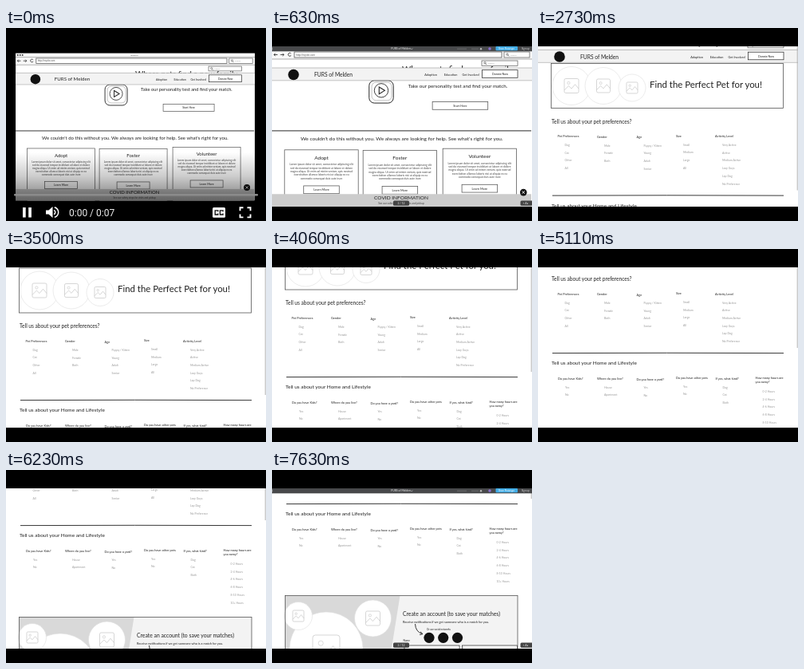
An HTML page for the animation above (7.7 s loop, 326 by 242 pixels).

```html
<!DOCTYPE html>
<html lang="en">
<head>
<meta charset="utf-8">
<title>Pet adoption prototype</title>
<style>
html, body { margin: 0; width: 100%; height: 100%; overflow: hidden; background: #000; }
svg { display: block; width: 326px; height: 242px; font-family: Lato, "Open Sans", sans-serif; }
</style>
</head>
<body>
<svg id="stage" viewBox="0 0 326 242" xmlns="http://www.w3.org/2000/svg"></svg>
<script>
const LOOP = 7700, STEP = 70;
const INK = '#222', LINE = '#555', PALE = '#999';

const text = (x, y, size, str, fill = INK, extra = '') =>
  `<text x="${x}" y="${y}" font-size="${size}" fill="${fill}" ${extra}>${str}</text>`;
const mid = (x, y, size, str, fill = INK) => text(x, y, size, str, fill, 'text-anchor="middle"');
const rect = (x, y, w, h, fill = '#fff', stroke = 'none', sw = .7, r = 0) =>
  `<rect x="${x}" y="${y}" width="${w}" height="${h}" rx="${r}" fill="${fill}" stroke="${stroke}" stroke-width="${sw}"/>`;
const circle = (x, y, r, fill = '#fff', stroke = 'none', sw = .6) =>
  `<circle cx="${x}" cy="${y}" r="${r}" fill="${fill}" stroke="${stroke}" stroke-width="${sw}"/>`;
const path = (d, stroke = LINE, sw = .7, fill = 'none') =>
  `<path d="${d}" stroke="${stroke}" stroke-width="${sw}" fill="${fill}"/>`;

// Image placeholder: framed hills and a sun, centred on x, y.
const picture = (x, y, s, c = '#bbb') => {
  const h = s / 2;
  return rect(x - h, y - h, s, s, 'none', c, .7, s * .1) + circle(x - h * .4, y - h * .4, s * .09, 'none', c) +
    path(`M${x - h} ${y + h * .6}l${h * .6} ${-h * .6} ${h * .4} ${h * .4} ${h * .5} ${-h * .6} ${h * .5} ${h * .6}`, c);
};

const searchBox = (x, y, w, h) =>
  rect(x, y, w, h, '#fff', LINE) + circle(x + 4, y + h / 2 - .4, 1.2, 'none', INK, .5) +
  path(`M${x + 4.8} ${y + h / 2 + .5}l1.4 1.4`, INK, .6) + text(x + 8, y + h / 2 + 1, 2.6, 'Search', '#999');

const browser = () =>
  rect(0, 23, 326, 16, '#f8f8f8') +
  [3, 6.2, 9.4].map(x => circle(x, 25.6, 1, '#222')).join('') +
  mid(162, 26.6, 2.8, 'Browser', '#555') + path('M0 28.5H326M0 39H326', '#777', .6) +
  path('M7 33.5H2.5l1.7-1.7M2.5 33.5l1.7 1.7M10.5 33.5H15l-1.7-1.7M15 33.5l-1.7 1.7M23.8 32a2 2 0 1 0 .2 2.3', INK, .8) +
  rect(28, 30, 260, 7, '#fff', LINE, .8) + text(30, 34.7, 3.1, 'http://mysite.com', '#555') + searchBox(291, 30, 32, 7);

const siteHeader = links => {
  const top = [['About', 150], ['Calendar', 175], ['Blog', 200], ['Login', 224], ['Contact', 249]];
  const main = [['Adoption', 199], ['Education', 224], ['Get Involved', 249]];
  return (links ? rect(0, 39.4, 326, 11, '#fafafa') + top.map(([s, x]) => mid(x, 45, 3.4, s)).join('') : '') +
    rect(0, 50, 326, 15.5, '#f3f3f3') + path('M0 50H326M0 65.8H326', '#999', .6) + searchBox(263, 41, 45, 6.3) +
    circle(27, 58.5, 6.8, '#111') + text(53, 61, 6.7, 'FURS of Melden') +
    main.map(([s, x]) => mid(x, 60, 3.8, s)).join('') +
    rect(263.5, 52.7, 44.5, 9.6, '#fff', INK) + mid(286, 59, 3.6, 'Donate Now');
};

const card = (x, y, title) => rect(x, y, 85, 70, '#fff', LINE) + mid(x + 42.5, y + 11, 6, title) +
  ['Lorem ipsum dolor sit amet, consectetur adipiscing elit', 'sed do eiusmod tempor incididunt ut labore et dolore',
   'magna aliqua. Ut enim ad minim veniam, quis nostrud', 'exercitation ullamco laboris nisi ut aliquip ex ea',
   'commodo consequat duis aute irure']
    .map((s, i) => mid(x + 42.5, y + 18 + i * 4, 3.1, s, '#444')).join('') +
  rect(x + 22, y + 41.5, 41, 9, '#fff', LINE) + mid(x + 42.5, y + 47.3, 3.6, 'Learn More');

const home = () => rect(0, 23, 326, 201) +
  `<g transform="translate(162 124) scale(1.087) translate(-162 -124.5)">` +
  text(163, 61.5, 10, 'Where pets find a new family') +
  rect(125, 71, 28, 26, '#fff', INK, .9, 6) + rect(128, 73, 23, 21, 'none', '#888', .5, 5) +
  circle(139, 82.5, 8, '#fff', INK, .8) + path('M136.5 78.5v8l6.5-4z', INK, 1) +
  text(170, 79.5, 5.75, 'Take our personality test and find your match.') +
  rect(198, 95.5, 64, 9, '#fff', LINE) + mid(230, 101.5, 3.5, 'Start Here') +
  path('M12 129H312', INK, .9) +
  text(46, 140.5, 6, "We couldn't do this without you. We always are looking for help. See what's right for you.") +
  card(27.5, 151, 'Adopt') + card(118, 151.5, 'Foster') + card(210, 149.5, 'Volunteer') +
  rect(12, 202, 300, 16, '#ccc') + mid(162, 208, 6, 'COVID INFORMATION') +
  mid(162, 214, 3, 'See our safety steps for visits and pickup', '#444') +
  circle(303, 200, 4, '#111') + path('M301.4 198.4l3.2 3.2m0-3.2l-3.2 3.2', '#fff', .8) +
  '</g>' + browser() + siteHeader(false);

const column = (x, y, heading, items, gap = 11) =>
  heading.split('|').map((s, i) => text(x, y + i * 5, 3.9, s)).join('') +
  items.split(',').map((s, i) => text(x + 9, y + gap + i * 9.7, 3.5, s, PALE)).join('');

const bubble = (x, y, r, icon) => circle(x, y, r, '#fff', '#ddd') + picture(x, y, icon, '#c4c4c4');

const quiz = () => rect(0, 23, 326, 460) + browser() + siteHeader(true) +
  path('M325.2 40V226', '#aaa', .9) +
  rect(16.5, 67, 291, 56, '#fff', LINE, .8) +
  bubble(42, 95, 24, 18) + bubble(82, 95, 23, 17) + bubble(118, 97.5, 17, 14) +
  text(140, 97, 11.4, 'Find the Perfect Pet for you!') +
  text(17, 142, 6.6, 'Tell us about your pet preferences?') +
  column(24.5, 159.5, 'Pet Preferences', 'Dog,Cat,Other,All') +
  column(74, 160, 'Gender', 'Male,Female,Both') +
  column(123.5, 160.5, 'Age', 'Puppy / Kitten,Young,Adult,Senior', 10.5) +
  column(173, 159, 'Size', 'Small,Medium,Large,All') +
  column(222, 159.5, 'Activity Level', 'Very Active,Active,Medium Active,Lazy Guys,Lap Dog,No Preference') +
  path('M18 232.6Q160 232 308 232.6', INK, .9) +
  text(17, 247, 6.5, 'Tell us about your Home and Lifestyle') +
  column(25, 265.5, 'Do you have Kids?', 'Yes,No') +
  column(74, 265.5, 'Where do you live?', 'House,Apartment') +
  column(123.5, 266.5, 'Do you have a yard?', 'Yes,No', 10.5) +
  column(173, 265, 'Do you have other pets', 'Yes,No', 10.5) +
  column(222.5, 265.5, 'If yes, what kind?', 'Dog,Cat,Both') +
  column(272.5, 265, 'How many hours are|you away?', '0-2 Hours,2-4 Hours,4-6 Hours,6-8 Hours,8-10 Hours,10+ Hours', 17) +
  account();

const account = () => rect(16.5, 347.5, 291.5, 110, '#f3f3f3') +
  path('M16.5 347.5H160.5L143 457H16.5z', 'none', 0, '#d9d9d9') +
  bubble(68, 414, 46, 34) + bubble(33, 373, 17.5, 14) + bubble(126.5, 376, 23, 18) +
  rect(16.5, 347.5, 291.5, 110, 'none', LINE, .8) +
  text(164, 373, 6.8, 'Create an account (to save your matches)') +
  text(164, 382, 3.9, 'Receive notifications if we get someone who is a match for you.') +
  path('M179.5 383Q180 393 188.5 395.5M186 392.8l3 2.8-3.8 1', INK, .9) +
  text(194, 391, 3, 'Or use social networks') +
  [197, 214.7, 232.5].map(x => circle(x, 400.3, 6.6, '#111')).join('') +
  text(164.5, 405, 3.3, 'Name') + rect(166, 410, 69, 9, '#fff', INK) + rect(238.5, 410, 69, 9, '#fff', INK);

const toolbar = () => rect(0, 23, 326, 6.3, '#48494b') +
  mid(161.5, 27, 3.4, 'FURS of Melden', '#eee') + path('M1 24.8l-1.5 1.3 1.5 1.3M174 25.6l1.2 1.2 1.2-1.2', '#ddd', .6) +
  path('M232 26.2h12M250 26.2h9', '#777', .8) + circle(262, 26.2, 1.2, '#bbb') + circle(273, 26, 1.8, '#8a6fd0') +
  rect(280.5, 23, 27.5, 5.3, '#42aee8', 'none', 0, 1) + mid(294, 26.8, 2.8, 'Share Prototype', '#fff') +
  text(313, 27, 3, 'Sign up', '#ddd') +
  rect(152, 216.5, 20, 6.3, '#444', 'none', 0, 1.5) + mid(162, 220.9, 3.4, '2 / 12', '#eee') +
  rect(311.5, 216.5, 16, 6.3, '#444', 'none', 0, 1.5) + text(314.5, 220.9, 3.4, '× Aa', '#eee');

const controls = () => rect(0, 156, 326, 86, 'url(#shade)') +
  rect(10, 208, 306, 2.6, '#8b8b8b', 'none', 0, 1) +
  rect(21, 225, 3.7, 12.5) + rect(28.2, 225, 3.7, 12.5) +
  path('M50 228.5h3.5l5-4.5v14l-5-4.5H50z', 'none', 0, '#fff') +
  path('M60.3 228.3q3 2.8 0 5.6M60.8 224.8c6.5 2.2 6.5 10.4 0 12.6', '#fff', 1.5) +
  `<g font-family="Roboto, sans-serif">${text(79, 235.7, 12, '0:00 / 0:07', '#eee')}</g>` +
  rect(259, 225, 16, 12.8, '#fff', 'none', 0, 1.5) +
  path('M265.8 230.2v-1.4h-3.6v5.2h3.6v-1.4M272 230.2v-1.4h-3.6v5.2h3.6v-1.4', '#111', 1.3) +
  path('M293.5 229.2v-4h4M302.5 225.2h4v4M306.5 233.4v4h-4M297.5 237.4h-4v-4', '#fff', 1.9);

const stage = document.getElementById('stage');
stage.innerHTML = `<defs>
  <clipPath id="frame"><rect y="23" width="326" height="201"/></clipPath>
  <linearGradient id="shade" x2="0" y2="1"><stop stop-color="#000" stop-opacity="0"/>
  <stop offset=".35" stop-color="#000" stop-opacity=".2"/><stop offset=".62" stop-color="#000" stop-opacity=".44"/>
  <stop offset="1" stop-color="#000" stop-opacity=".75"/></linearGradient></defs>
  ${rect(0, 0, 326, 242, '#000')}
  <g id="video"><g clip-path="url(#frame)">
    <g id="home">${home()}</g><g id="quiz">${quiz()}</g><g id="toolbar">${toolbar()}</g>
  </g></g><g id="controls">${controls()}</g>`;

const part = Object.fromEntries(['video', 'home', 'quiz', 'toolbar', 'controls']
  .map(id => [id, document.getElementById(id)]));
const ramp = (t, a, b) => Math.min(1, Math.max(0, (t - a) / (b - a)));
const ease = p => p * p * (3 - 2 * p);

// [time, scroll offset]
const scrollKeys = [[2310, 0], [2870, 30], [3150, 30], [3500, 43], [4060, 72], [4970, 101.5],
  [5040, 101.5], [5110, 102], [6230, 163], [6790, 190]];
const scrollAt = t => scrollKeys.slice(1).reduce((sum, [time, pos], i) =>
  sum + (pos - scrollKeys[i][1]) * ramp(t, scrollKeys[i][0], time), 0);

function draw(t) {
  const grow = ease(ramp(t, 0, 630));
  const onQuiz = t >= 1330;
  part.video.setAttribute('transform',
    `translate(${162 + grow} ${124 - grow / 2}) scale(${.92 + .08 * grow}) translate(-163 -123.5)`);
  part.home.style.display = onQuiz ? 'none' : '';
  part.quiz.style.display = onQuiz ? '' : 'none';
  part.quiz.setAttribute('transform', `translate(0 ${-scrollAt(t)})`);
  part.toolbar.style.opacity = onQuiz ? 1 - ramp(t, 1330, 1890) + ramp(t, 6790, 7280) : ramp(t, 210, 630);
  part.controls.style.opacity = 1 - ramp(t, 0, 350);
}

function tick() {
  draw(Math.floor(performance.now() % LOOP / STEP) * STEP);
  requestAnimationFrame(tick);
}
tick();
</script>
</body>
</html>
```
